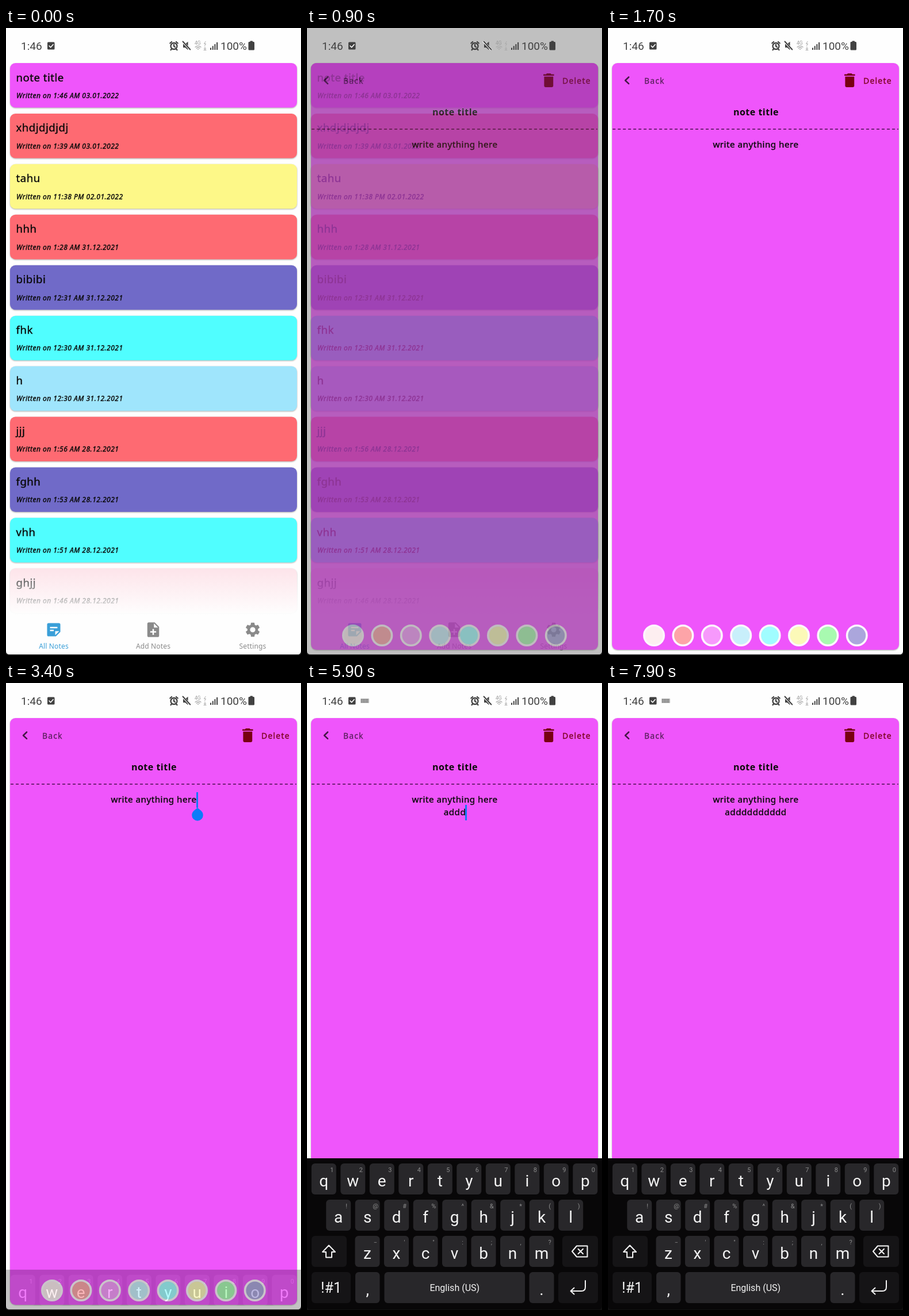
An HTML page for the animation above (8000 ms loop, 513 by 1091 pixels).

```html
<!DOCTYPE html>
<html lang="en">
<head>
<meta charset="utf-8">
<title>Notes</title>
<style>
  html, body { margin: 0; width: 100%; height: 100%; overflow: hidden; background: #fefefe; }
  svg { display: block; width: 513px; height: 1091px; }
  text { font-family: "Noto Sans", "Open Sans", sans-serif; white-space: pre; }
  .sys, .sys text { font-family: Roboto, sans-serif; }
  .mid { text-anchor: middle; }
  .hand { stroke: #0a0a0a; stroke-width: .4; fill: #0a0a0a; letter-spacing: .5px; }
  .card { filter: drop-shadow(0 1px 1.2px rgba(0, 0, 0, .32)); }
  .line { fill: none; stroke-linecap: round; stroke-linejoin: round; }
</style>
</head>
<body>
<svg id="stage" viewBox="0 0 513 1091">
  <defs>
    <linearGradient id="fade" x1="0" y1="0" x2="0" y2="1">
      <stop offset="0" stop-color="#fefefe" stop-opacity="0"/>
      <stop offset="1" stop-color="#fefefe"/>
    </linearGradient>
  </defs>
  <rect width="513" height="1091" fill="#fefefe"/>
  <g id="list"></g>
  <g id="page"></g>
  <rect id="dim" width="513" height="1091" opacity="0"/>
  <g id="status" class="sys" fill="#414141"></g>
  <g id="keys" class="sys"></g>
  <path d="M0 1084q0 6 6 6h501q6 0 6-6v7H0z" fill="#111"/>
</svg>
<script>
const LOOP = 8000;
const $ = id => document.getElementById(id);
const text = (x, y, size, str, attrs = '') =>
  `<text x="${x}" y="${y}" font-size="${size}" ${attrs}>${str}</text>`;
const rect = (x, y, w, h, r, fill, attrs = '') =>
  `<rect x="${x}" y="${y}" width="${w}" height="${h}" rx="${r}" fill="${fill}" ${attrs}/>`;
const path = (d, attrs = '') => `<path d="${d}" ${attrs}/>`;
const icon = (cx, cy, scale, fill, d) =>
  path(d, `fill="${fill}" fill-rule="evenodd" transform="translate(${cx} ${cy}) scale(${scale}) translate(-12 -12)"`);

const PINK = '#ef55fb', RED = '#fe6a72', VIOLET = '#706ac8', CYAN = '#50feff';

const notes = [
  ['note title', '1:46 AM 03.01.2022', PINK],
  ['xhdjdjdjdj', '1:39 AM 03.01.2022', RED],
  ['tahu', '11:38 PM 02.01.2022', '#fdf888'],
  ['hhh', '1:28 AM 31.12.2021', RED],
  ['bibibi', '12:31 AM 31.12.2021', VIOLET],
  ['fhk', '12:30 AM 31.12.2021', CYAN],
  ['h', '12:30 AM 31.12.2021', '#9fe5fc'],
  ['jjj', '1:56 AM 28.12.2021', RED],
  ['fghh', '1:53 AM 28.12.2021', VIOLET],
  ['vhh', '1:51 AM 28.12.2021', CYAN],
  ['ghjj', '1:46 AM 28.12.2021', '#fddfe6'],
];

const iconPaths = {
  note: 'M19 3H5a2 2 0 0 0-2 2v14a2 2 0 0 0 2 2h10l6-6V5a2 2 0 0 0-2-2zM7 8h10v2H7zM12 14H7v-2h5zM14 19.5V14h5.5z',
  add: 'M14 2H6a2 2 0 0 0-2 2v16a2 2 0 0 0 2 2h12a2 2 0 0 0 2-2V8zM16 16h-3v3h-2v-3H8v-2h3v-3h2v3h3zM13 9V3.5L18.5 9z',
  gear: 'M19.14 12.94a7 7 0 0 0 0-1.88l2.03-1.58a.5.5 0 0 0 .12-.61l-1.92-3.32a.5.5 0 0 0-.59-.22l-2.39.96a7 7 0 0 0-1.62-.94l-.36-2.54a.5.5 0 0 0-.48-.41h-3.84a.5.5 0 0 0-.47.41l-.36 2.54a7 7 0 0 0-1.62.94l-2.39-.96a.5.5 0 0 0-.59.22L2.74 8.87a.5.5 0 0 0 .12.61l2.03 1.58a7 7 0 0 0 0 1.88l-2.03 1.58a.5.5 0 0 0-.12.61l1.92 3.32a.5.5 0 0 0 .59.22l2.39-.96a7 7 0 0 0 1.62.94l.36 2.54a.5.5 0 0 0 .48.41h3.84a.5.5 0 0 0 .47-.41l.36-2.54a7 7 0 0 0 1.62-.94l2.39.96a.5.5 0 0 0 .59-.22l1.92-3.32a.5.5 0 0 0-.12-.61zM12 15.6a3.6 3.6 0 1 1 0-7.2 3.6 3.6 0 0 1 0 7.2z',
  bin: 'M6 19a2 2 0 0 0 2 2h8a2 2 0 0 0 2-2V7H6zM19 4h-3.5l-1-1h-5l-1 1H5v2h14z',
};

function buildList() {
  const cards = notes.map(([title, date, color], i) => {
    const y = 61 + i * 87.93;
    return rect(7, y, 499, 77.6, 9.5, color, 'class="card"') +
      text(17.5, y + 31.5, 18.6, title, 'class="hand"') +
      text(18, y + 60.8, 12, 'Written on ' + date, 'class="hand" font-style="italic"');
  }).join('');
  const tabs = [
    [83, 'All Notes', 'note', '#3a9fd8'],
    [256, 'Add Notes', 'add', '#8a8a8a'],
    [429, 'Settings', 'gear', '#8a8a8a'],
  ].map(([x, label, name, color]) =>
    icon(x, 1047, 1.28, color, iconPaths[name]) +
    text(x, 1080, 12, label, `class="mid" fill="${color}" letter-spacing=".15"`)).join('');
  return cards + rect(0, 925, 513, 97, 0, 'url(#fade)') + rect(0, 1021, 513, 70, 0, '#fefefe') + tabs;
}

function buildPage() {
  const swatches = ['#fdeef0', '#fda4a8', '#f799fc', '#c8effb', '#a0fdff', '#fbf9b8', '#a8fab0', '#aba6dc'];
  return rect(7, 61, 499, 1021, 9.5, PINK, 'class="card"') +
    path('M36 85.5L30 91.2l6 5.7', 'class="line" stroke="#451848" stroke-width="2.6"') +
    text(63, 96.5, 14, 'Back', 'fill="#5b205f" letter-spacing="1.1" stroke="#5b205f" stroke-width=".3"') +
    icon(420.3, 91, 1.32, '#780012', iconPaths.bin) +
    text(444, 96.5, 14, 'Delete', 'fill="#7d0420" letter-spacing="1.2" stroke="#7d0420" stroke-width=".3"') +
    text(257.5, 151.5, 16, 'note title', 'class="mid" font-weight="700" fill="#0a0a0a" letter-spacing=".5"') +
    path('M8 176H505', 'stroke="#4a1050" stroke-width="1.5" stroke-dasharray="5 4"') +
    text(257, 207.5, 15.2, 'write anything here', 'class="mid hand"') +
    text(257, 229.5, 15.2, '', 'id="typed" class="mid hand"') +
    rect(0, 0, 3, 27, 0, '#1479f5', 'id="caret"') +
    path('M333 217l6.8 5.8a9.8 9.8 0 1 1-13.6 0z', 'id="handle" fill="#0a7cf8"') +
    swatches.map((c, i) =>
      `<circle cx="${80 + i * 50.4}" cy="1057" r="17.2" fill="${c}" stroke="#fdf6fd" stroke-width="3.6"/>`).join('');
}

function buildStatus() {
  const bars = [0, 1, 2, 3].map(i =>
    rect(355 + i * 3.7, 34.5 - i * 3.2, 2, 3.5 + i * 3.2, 0, '#414141')).join('');
  let dots = '';
  for (let i = 0; i < 15; i++) dots += rect(94.5 + (i % 5) * 2.5, 28 + (i / 5 | 0) * 2.3, 1.4, 1.3, 0, '#555');
  return text(26, 38, 19, '1:46') +
    rect(72, 24.5, 12.5, 13, 1.5, '#414141') +
    path('M75 31l2.6 2.7 4.4-5', 'class="line" stroke="#fff" stroke-width="1.6"') +
    `<g id="kbIcon">${rect(93, 27, 15, 8, 1, '#bbb') + dots}</g>` +
    path('M286.5 31.5a5.5 5.5 0 1 0 11 0a5.5 5.5 0 1 0-11 0M292 28.8v3l2 1.3M285.3 26.5l2.8-2.5M298.7 26.5l-2.8-2.5M287.5 37l-1 1.2M296.5 37l1 1.2',
      'class="line" stroke="#414141" stroke-width="2.3"') +
    path('M308 28h3.5l5-4.3v14.6l-5-4.3H308z') +
    path('M306.5 23l14 15', 'stroke="#fefefe" stroke-width="3.6"') +
    path('M307.5 23.5l12.8 14', 'class="line" stroke="#414141" stroke-width="2"') +
    text(328, 29, 8.5, '4G', 'fill="#999"') +
    path('M329 33.2q5-4 10 0M331 35.2q3-2.4 6 0M333.4 37h1.2', 'class="line" stroke="#aaa" stroke-width="1.3"') +
    path('M347 23.5l-2.5 4h3l-2 3.5M346 33v4M344.5 35.5l1.5 2 1.5-2M344 38.5h4', 'class="line" stroke="#aaa" stroke-width="1"') +
    bars + text(373, 38, 19, '100%') +
    rect(421.5, 24, 10.5, 14.5, 1.5, '#414141') + rect(424.5, 22.5, 4.5, 3, .5, '#414141');
}

function buildKeys() {
  const KEY = '#28272a', DARK = '#151416';
  const key = (x, y, w, label, size, fill, base = 40) =>
    rect(x, y, w, 54, 6, fill) + text(x + w / 2, y + base, size, label, 'class="mid" fill="#f4f4f4"');
  const rows = [
    [7.8, 836, 'qwertyuiop', '1234567890'],
    [33.2, 899, 'asdfghjkl', '!@#%^&*()'],
    [83.5, 962, 'zxcvbnm', '−\'":;,?'],
  ];
  const esc = c => c === '&' ? '&amp;' : c;
  const letters = rows.map(([x0, y, chars, hints]) => [...chars].map((c, i) => {
    const x = x0 + i * 50.5;
    return key(x, y, 43, c, 28, KEY) +
      text(x + 35.5, y + 15, 11, esc(hints[i]), 'class="mid" fill="#8c8c8c"');
  }).join('')).join('');
  const stroke = 'class="line" stroke="#f4f4f4" stroke-width="2"';
  return rect(0, 827, 513, 270, 0, '#080708') + letters +
    rect(8, 962, 61, 54, 6, DARK) + path('M38 978.5l11 11.5h-6v9.5h-10V990h-6z', stroke) +
    rect(444, 962, 62, 54, 6, DARK) +
    path('M469 979.5h18.5v19H469l-8-9.5zM471.5 984.8l8.5 8.5M480 984.8l-8.5 8.5', stroke) +
    key(8, 1025, 68, '!#1', 25, DARK, 36) + key(84, 1025, 42.5, ',', 28, KEY) +
    key(134.5, 1025, 244.5, 'English (US)', 16, KEY, 33) + key(386.5, 1025, 43, '.', 28, KEY) +
    rect(437, 1025, 69, 54, 6, DARK) +
    path('M484 1040v11q0 7-7 7h-18M464.5 1052.5l-6 5.5 6 5.5', stroke);
}

$('list').innerHTML = buildList();
$('page').innerHTML = buildPage();
$('status').innerHTML = buildStatus();
$('keys').innerHTML = buildKeys();

// Piecewise linear track: [time, value] pairs.
function track(t, steps) {
  if (t <= steps[0][0]) return steps[0][1];
  for (let i = 1; i < steps.length; i++) {
    const [a, u] = steps[i - 1], [b, v] = steps[i];
    if (t < b) return u + (v - u) * (t - a) / (b - a);
  }
  return steps[steps.length - 1][1];
}

const pageFade = [[600, 0], [700, .1], [900, .77], [1000, 1]];
const dimFade = [[500, 0], [700, .12], [900, .245], [1000, .22], [1300, 0]];
const keysFade = [[3300, 0], [3400, .23], [3500, .7], [3600, 1]];
const keysDrop = [[3300, 265], [3400, 195], [3500, 80], [3600, 20], [3700, 0]];

const TAP = 3200, NEWLINE = 4500;
const strokes = [NEWLINE, 5050, ...Array.from({ length: 10 }, (_, i) => 5300 + i * 225)];

function render(t) {
  const fade = track(t, pageFade);
  $('page').setAttribute('opacity', fade);
  $('dim').setAttribute('opacity', track(t, dimFade));
  $('list').style.display = fade < 1 ? '' : 'none';

  $('keys').setAttribute('opacity', track(t, keysFade));
  $('keys').setAttribute('transform', `translate(0 ${track(t, keysDrop)})`);
  $('kbIcon').style.display = t >= 3600 ? '' : 'none';

  const done = strokes.filter(s => s <= t);
  const word = done.slice(1).map((_, i) => i ? 'd' : 'a').join('');
  const typed = $('typed'), caret = $('caret');
  if (typed.textContent !== word) typed.textContent = word;

  const last = done.length ? done[done.length - 1] : TAP;
  const lit = t >= TAP && (t - last) % 1000 < 500;
  caret.style.display = lit ? '' : 'none';
  if (lit) {
    const width = word ? typed.getComputedTextLength() : 0;
    caret.setAttribute('x', done.length ? Math.round(256 + width / 2) : 331);
    caret.setAttribute('y', done.length ? 212 : 190);
  }
  $('handle').style.display = t >= TAP && t < NEWLINE ? '' : 'none';
}

const start = performance.now();
function tick() {
  render((performance.now() - start) % LOOP);
  requestAnimationFrame(tick);
}
tick();
</script>
</body>
</html>
```
